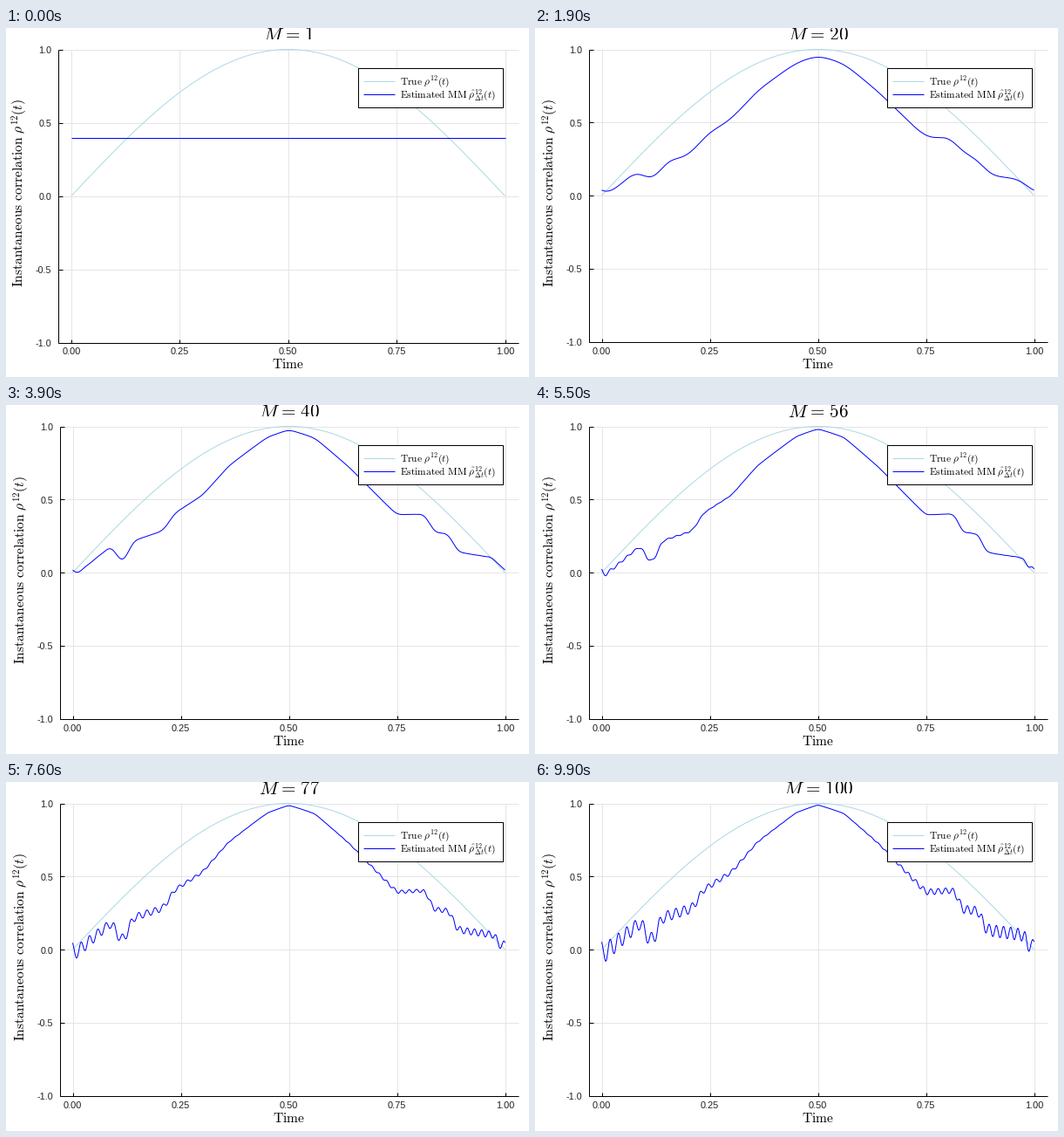
Recreate the animation shown at these times as a matplotlib script. Size 600 px wide and 400 px high, loop 10000 ms.

```python
import numpy as np
import matplotlib.pyplot as plt
from matplotlib.animation import FuncAnimation
from matplotlib.patches import Rectangle

plt.rcParams.update({"mathtext.fontset": "cm", "font.family": "Liberation Sans"})

W, H, FRAMES = 600, 400, 100
PX = 0.72  # one pixel in points
GRID, TRUE, EST = "#e5e5e5", "lightblue", "blue"
TOP, RIGHT_TICK, RIGHT = 25, 573, 588
FLAT = 0.395  # level of the estimate at M = 1

N = 1000
t = np.arange(N + 1) / N
k = np.arange(N // 2 + 1)
cos = np.cos(2 * np.pi * t)

# Broad course of the correlation as (time, value)
TREND = [(0, -.05), (.09, .19), (.115, .03), (.14, .22), (.21, .28),
         (.235, .41), (.30, .53), (.36, .74), (.45, .945), (.5, 1),
         (.56, .94), (.64, .73), (.75, .39), (.815, .41), (.835, .27),
         (.87, .27), (.89, .13), (.975, .10), (1, -.04)]
trend = np.interp(t, *zip(*TREND))

# A slow chirp that fades as the correlation nears one
chirp = np.cos(2 * np.pi * (51.665 * t + 4.6 * t ** 2))
rough = trend + 0.13 * (1 - trend) ** 2 * chirp

# Covariance spectrum; the variance 1 + A cos fixes the flat first level
A = (FLAT - rough[:-1].mean()) / (rough * cos)[:-1].mean()
cov = np.fft.rfft((rough * (1 + A * cos))[:-1])


def estimate(m):
    """Fejer-smoothed covariance over smoothed variance."""
    num = np.fft.irfft(cov * np.clip(1 - k / m, 0, None), N)
    return np.append(num, num[0]) / (1 + A * (1 - 1 / m) * cos)


fig = plt.figure(figsize=(W / 100, H / 100), dpi=100, facecolor="white")
ax = fig.add_axes([0, 0, 1, 1])
ax.set(xlim=(0.5, W + 0.5), ylim=(H + 0.5, 0.5))
ax.axis("off")


def line(xs, ys, color, z):
    return ax.plot(xs, ys, color=color, lw=PX, zorder=z, solid_capstyle="butt")[0]


def label(x, y, s, px, ha="center", **kw):
    return ax.text(x, y, s, fontsize=px * PX, ha=ha, va="baseline", zorder=6, **kw)


class Layout:
    """Axes, grid, labels and the true curve for one set of margins."""

    def __init__(self, x0, left, bottom):
        self.x0, self.bottom = x0, bottom
        self.mid = (left + RIGHT) / 2
        parts = self.parts = []
        for v in np.linspace(0, 1, 5):
            x = self.x(v)
            parts += [line([x, x], [TOP, bottom], GRID, 1),
                      line([x, x], [bottom - 4, bottom], "black", 4),
                      label(x, 375, f"{v:.2f}", 11, color="#222222")]
        for v in np.linspace(-1, 1, 5):
            y = self.y(v)
            parts += [line([left, RIGHT], [y, y], GRID, 1),
                      line([left, left + 5], [y, y], "black", 4),
                      label(left - 7, y + 4.7, f"{v:.1f}", 10.7, ha="right",
                            color="#222222")]
        parts += [
            line([left, left], [TOP, bottom], "black", 4),
            line([left, RIGHT], [bottom, bottom], "black", 4),
            line(self.x(t), self.y(np.sin(np.pi * t)), TRUE, 2),
            label(self.mid - 0.5, 391, r"$\mathrm{Time}$", 15.5),
            label(left - 38.5, 189.5,
                  r"$\mathrm{Instantaneous\ correlation}\ \rho^{12}(t)$", 15.6,
                  rotation=90, rotation_mode="anchor")]

    def x(self, v):
        return self.x0 + v * (RIGHT_TICK - self.x0)

    def y(self, v):
        return TOP + (1 - v) * (self.bottom - TOP) / 2

    def show(self, on):
        for p in self.parts:
            p.set_visible(on)


first, rest = Layout(75.4, 60, 361), Layout(77, 62, 360)
curve = line([], [], EST, 3)
title = label(325, 15, "", 21.2)
cover = ax.add_patch(Rectangle((260, 13.6), 130, 10, fc="white", ec="none", zorder=7))

ax.add_patch(Rectangle((404, 46), 166, 45.5, fc="white", ec="black", lw=PX, zorder=5))
for y, color, s in [
        (61, TRUE, r"$\mathrm{True}\ \rho^{12}(t)$"),
        (76, EST, r"$\mathrm{Estimated\ MM}\ \hat{\rho}^{12}_{\Delta t}(t)$")]:
    line([410, 446], [y, y], color, 6)
    label(453, y + 4.5, s, 11.5, ha="left")


def draw(i):
    m = i + 1
    lay = first if m == 1 else rest
    first.show(lay is first)
    rest.show(lay is rest)
    curve.set_data(lay.x(t), lay.y(estimate(m)))
    cover.set_visible(m < 50 or m == FRAMES)
    title.set_text(rf"$M\hspace{{0.08}}=\hspace{{0.08}}{m}$")
    title.set_x(lay.mid + 0.8)
    return curve, title


anim = FuncAnimation(fig, draw, frames=FRAMES, interval=100, repeat=True,
                     repeat_delay=0, blit=False)
plt.show()
```
